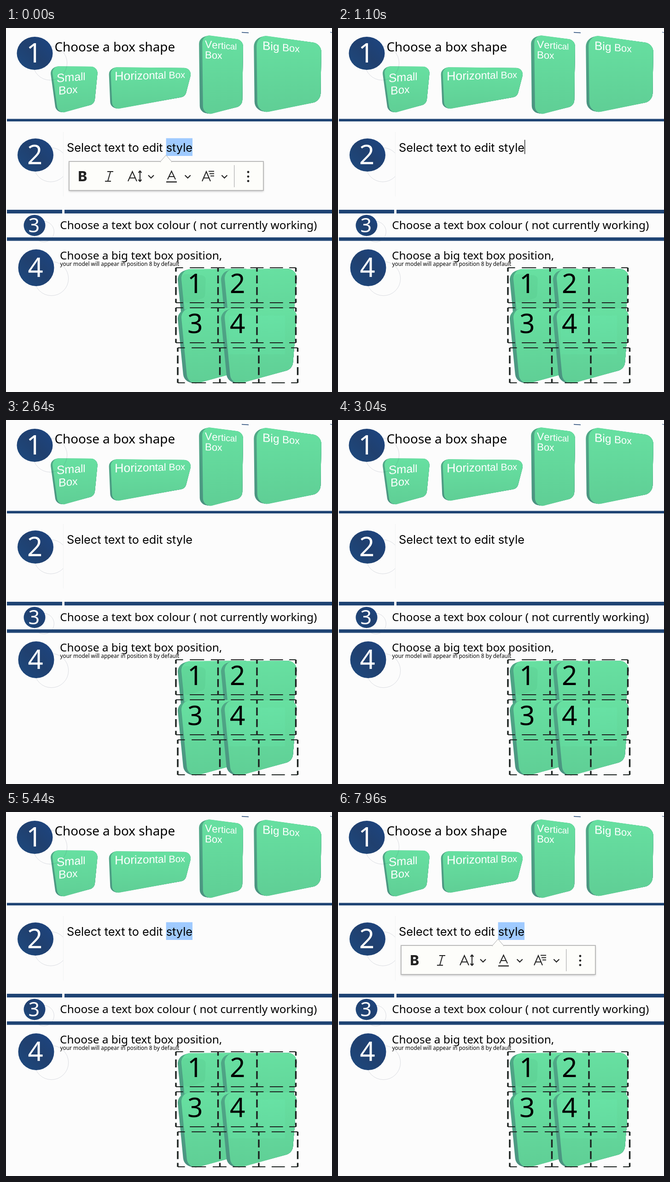
Animation, 708 px wide and 791 px high, one loop 8000 ms. Source, as an HTML page with a canvas:

```html
<!DOCTYPE html>
<html lang="en">
<head>
<meta charset="utf-8">
<title>Box editor steps</title>
<style>
html, body { margin: 0; width: 100%; height: 100%; overflow: hidden; background: #fcfcfc; }
canvas { display: block; width: 100vw; height: 100vh; }
</style>
</head>
<body>
<canvas id="stage" width="708" height="791"></canvas>
<script>
const W = 708, H = 791, LOOP = 8000;
const NOTO = '"Noto Sans", "Open Sans", sans-serif';
const INTER = 'Inter, Roboto, sans-serif';
const ARIAL = '"Liberation Sans", Arial, sans-serif';
const PAPER = '#fcfcfc', NAVY = '#1f4474', INK = '#222', BORDER = '#bbb';
const stage = document.getElementById('stage');
const page = document.createElement('canvas');
page.width = W;
page.height = H;
let g = page.getContext('2d');

function text(str, x, y, size, family = NOTO, color = '#000', weight = 400) {
  g.font = `${weight} ${size}px ${family}`;
  g.fillStyle = color;
  g.fillText(str, x, y);
}

function rect(x, y, w, h, color) {
  g.fillStyle = color;
  g.fillRect(x, y, w, h);
}

function line(points, color = INK, width = 2) {
  g.beginPath();
  points.forEach(p => g.lineTo(...p));
  g.strokeStyle = color;
  g.lineWidth = width;
  g.stroke();
}

function oval(x, y, rx, ry = rx) {
  g.beginPath();
  g.ellipse(x, y, rx, ry, 0, 0, 2 * Math.PI);
}

function blend(x0, y0, x1, y1, ...colors) {
  const fill = g.createLinearGradient(x0, y0, x1, y1);
  colors.forEach((c, i) => fill.addColorStop(i / (colors.length - 1), c));
  return fill;
}

function roundPoly(pts, r) {
  const [a, d] = [pts[0], pts.at(-1)];
  g.beginPath();
  g.moveTo((a[0] + d[0]) / 2, (a[1] + d[1]) / 2);
  pts.forEach((p, i) => g.arcTo(...p, ...pts[(i + 1) % pts.length], r));
  g.closePath();
}

// Box seen in perspective: the right side drops at the top and lifts at the
// bottom, the lower corners move in, and a dark side shows on the left.
function slab(x, y, w, h, { drop = 0, lift, left = 2, right = 2, r = 14, depth = 5 }) {
  const face = shift => [
    [x - shift, y + shift * .4],
    [x + w, y + drop],
    [x + w - right, y + h - lift],
    [x + left - shift, y + h - shift * .3]
  ];
  g.fillStyle = blend(0, y, 0, y + h, '#50aa87', '#4a9180');
  for (let d = depth; d > 0; d--) {
    roundPoly(face(d), r);
    g.fill();
  }
  roundPoly(face(0), r);
  g.fillStyle = blend(0, y, 0, y + h, '#67e0a1', '#5fce95');
  g.fill();
}

// Text receding to the right: glyphs shrink from size a to size b.
function slantText(str, x, y, a, b, slope) {
  g.save();
  g.transform(1, slope, 0, 1, x, y);
  let pos = 0;
  [...str].forEach((ch, i) => {
    text(ch, pos, 0, a + (b - a) * i / (str.length - 1), ARIAL, '#fff');
    pos += g.measureText(ch).width;
  });
  g.restore();
}

// Numbered disc with a thin ring behind it to the lower right.
function badge(label, x, y, rx, ry, size = 58) {
  oval(x + rx * .85, y + ry * .59, rx * .95);
  g.strokeStyle = 'rgba(50,60,90,.17)';
  g.lineWidth = 1;
  g.stroke();
  oval(x, y, rx, ry);
  g.fillStyle = blend(x - rx, y + ry, x + rx, y - ry, '#1d4a80', '#20406f', '#1c4583');
  g.fill();
  g.textAlign = 'center';
  text(label, x - 1.3, y + size * .34, size, NOTO, '#fff');
  g.textAlign = 'left';
}

function shapePicker() {
  slab(99, 83, 101, 104, { drop: 1, lift: 22, left: 14, right: 8, depth: 4 });
  slab(227, 85, 178, 93, { drop: 2, lift: 29, left: 4, right: 16, depth: 4 });
  slab(426, 14, 89, 177, { drop: 12, lift: 22, r: 16, depth: 7 });
  slab(544, 14, 141, 173, { drop: 20, lift: 28, r: 21, depth: 6 });
  slantText('Small', 110, 118, 26, 23, -.08);
  slantText('Box', 114, 145, 25, 23, -.1);
  slantText('Horizontal Box', 236, 114, 27, 20, -.037);
  slantText('Vertical', 432, 43, 23, 18, .06);
  slantText('Box', 432, 66, 22.5, 21, .03);
  slantText('Big Box', 557, 47, 26, 21, .07);
  badge('1', 62.5, 55, 39, 36);
  text('Choose a box shape', 105.5, 51, 27.8);
  line([[512, 9.5], [527, 10.5]], NAVY, 1.5);
  line([[704, 9], [708, 10]], NAVY, 1.2);
}

// n dashes along a straight edge, with half dashes in the corners.
function dashedEdge(x0, y0, x1, y1, n, width) {
  const step = Math.hypot(x1 - x0, y1 - y0) / n, dash = step * .68;
  g.setLineDash([dash, step - dash]);
  g.lineDashOffset = dash / 2;
  line([[x0, y0], [x1, y1]], '#1c2220', width);
  g.setLineDash([]);
}

function positionPicker() {
  for (let i = 0; i < 4; i++)
    slab(379 + 94 * (i % 2), 524 + 85 * (i >> 1), 160, 169,
      { drop: -1, lift: 37, left: 16, right: 11, r: 20, depth: 8 });
  roundPoly([[381, 534], [434, 538], [432, 586], [386, 600]], 9);
  g.fillStyle = 'rgba(60,160,110,.12)';
  g.fill();
  rect(484, 625, 122, 84, 'rgba(110,240,180,.14)');

  for (let row = 0; row < 3; row++) {
    const top = 521 + 87 * row, bottom = top + 76;
    const edge = col => 369 + 84.5 * col + 7 * Math.min(col, 1) + (row === 2 ? 4 : 0);
    for (let col = 0; col < 4; col++) {
      dashedEdge(edge(col), top, edge(col), bottom, 3, 3.4);
      if (col < 3)
        for (const y of [top, bottom]) dashedEdge(edge(col), y, edge(col + 1), y, 2, 2);
    }
  }
  for (let i = 0; i < 4; i++)
    text(i + 1, 394 + 92 * (i % 2), 576 + 87 * (i >> 1), 58.5);
}

function drawPage() {
  rect(0, 0, W, H, PAPER);
  shapePicker();
  rect(2, 197.5, 706, 5.5, NAVY);

  badge('2', 64, 276, 39, 36);
  rect(124, 250, 14, 90, PAPER);
  rect(124, 226, 1, 140, 'rgba(50,60,90,.05)');

  badge('3', 62, 429, 23.5, 23, 43);
  text('Choose a text box colour ( not currently working)', 117.3, 437, 24.4);
  rect(2, 395, 706, 8, NAVY);
  rect(122, 395, 5, 8, PAPER);
  rect(2, 455, 706, 7.5, NAVY);

  badge('4', 65.5, 521, 39, 40);
  text('Choose a big text box position,', 117, 503, 24.4);
  text('your model will appear in position 8 by default', 117.5, 517, 11.9);
  positionPicker();
}

function letterA(x, top, base, half) {
  const bar = top + (base - top) * .66;
  line([[x - half, base], [x, top], [x + half, base]]);
  line([[x - half * .66, bar], [x + half * .66, bar]]);
}

// Open angle with its tip at (x, y); a negative size points it down.
function angle(x, y, half, size, color, width) {
  line([[x - half, y + size], [x, y], [x + half, y + size]], color, width);
}

function toolbar() {
  const x = 137, y = 290, w = 422, h = 63, tip = 347.5;
  g.save();
  g.shadowColor = 'rgba(0,0,0,.25)';
  g.shadowBlur = 4;
  g.shadowOffsetY = 2;
  rect(x, y, w, h, '#fdfdfa');
  g.restore();
  g.strokeStyle = BORDER;
  g.lineWidth = 2;
  g.strokeRect(x, y, w, h);
  angle(tip, 277, 12.5, 14.5, BORDER);
  g.fillStyle = '#fdfdfa';
  g.fill();

  text('B', 156.5, 332.5, 29.5, INTER, INK, 800);

  line([[227, 312], [221, 333]]);
  for (const [mid, bar] of [[226.5, 312], [221.5, 333]]) line([[mid - 6.5, bar], [mid + 6.5, bar]]);

  letterA(274.5, 312, 333, 9.5);
  line([[291, 311], [291, 333]]);
  angle(291, 310.5, 3.5, 4);
  angle(291, 333.5, 3.5, -4);

  letterA(359.5, 311, 329, 8.5);
  line([[348, 334.5], [371, 334.5]], INK, 2.4);

  letterA(435, 312, 333, 9);
  for (let i = 0; i < 3; i++) {
    line([[440 + 2 * i, 311.5 + 5 * i], [452, 311.5 + 5 * i]]);
    angle(315 + 79.7 * i, 326, 6, -6, INK, 2.2);
    oval(526, 313 + 9.8 * i, 2.4);
    g.fillStyle = INK;
    g.fill();
  }
  rect(495, 298, 1.5, 48, BORDER);
}

// Number of trailing characters selected at time t.
function selected(t) {
  if (t < 400) return 5;
  if (t < 3700) return 0;
  return Math.min(5, 1 + Math.floor((t - 3700) / 90));
}

function editor(t) {
  const str = 'Select text to edit style', x = 132, size = 25.3;
  const count = selected(t);
  g.font = `400 ${size}px ${INTER}`;
  const end = x + g.measureText(str).width;
  if (count) {
    const start = x + g.measureText(str.slice(0, -count)).width;
    rect(start, 239.5, end - start, 38.5, '#9fcaff');
  }
  text(str, x, 269, size, INTER);
  if (t >= 400 && t < 2040) rect(end, 243, 1.3, 31, '#111');
  if (t < 400 || t >= 6000) toolbar();
}

drawPage();
g = stage.getContext('2d');

function frame() {
  g.drawImage(page, 0, 0);
  editor(performance.now() % LOOP);
  requestAnimationFrame(frame);
}
frame();
</script>
</body>
</html>
```
